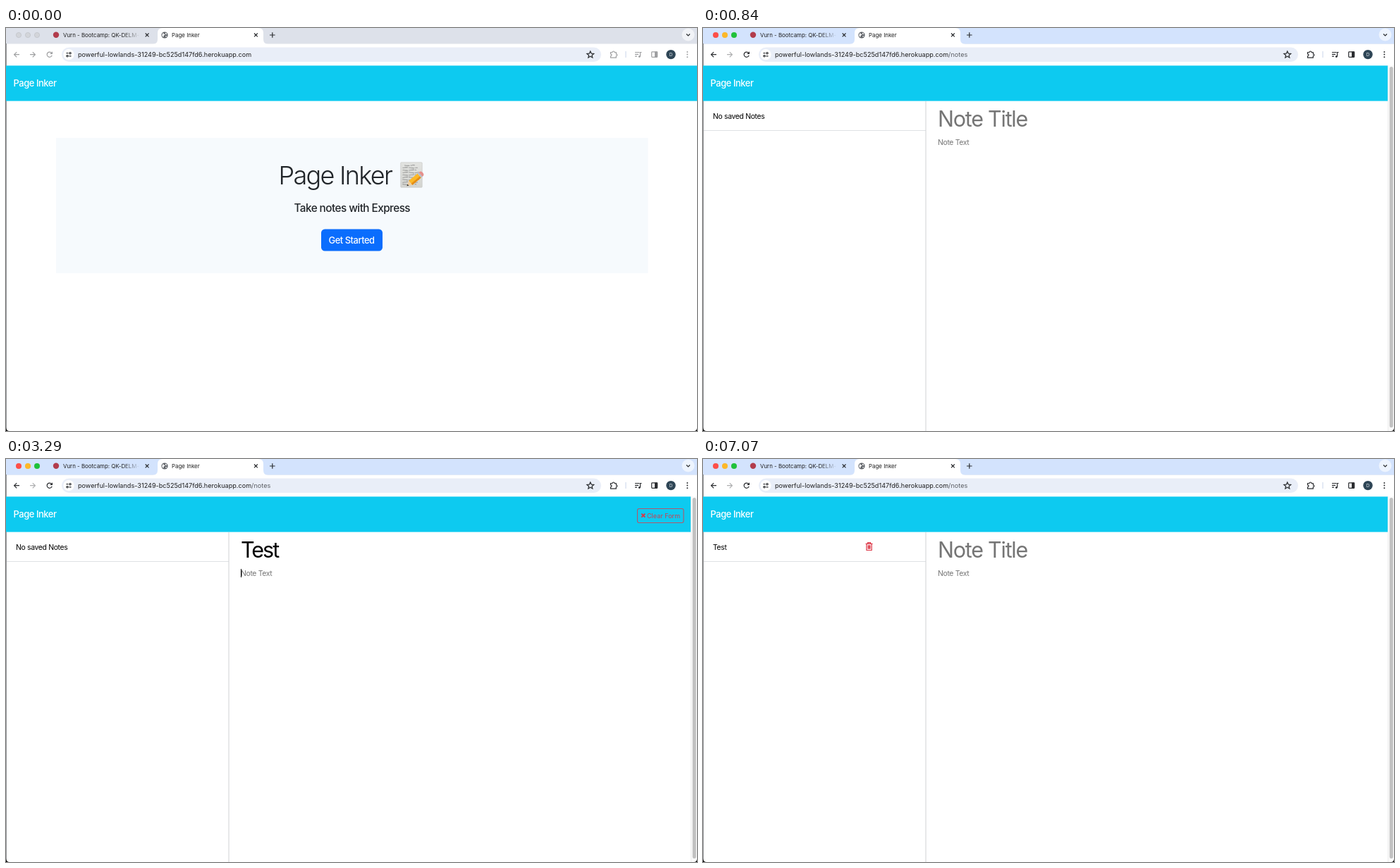
An HTML page that plays this animation: 980x572 px, repeating every 8 s.

```html
<!DOCTYPE html>
<html lang="en">
<head>
<meta charset="utf-8">
<title>Page Inker</title>
<style>
html, body { margin: 0; width: 980px; height: 572px; overflow: hidden; background: #fff; }
svg { display: block; }
text { font-family: Inter, Roboto, sans-serif; font-optical-sizing: none; white-space: pre; fill: #1f1f1f; }
.tab { font-size: 7.9px; }
.url { font-size: 9.05px; letter-spacing: .03px; }
.brand { font-size: 12.9px; font-weight: 450; letter-spacing: -.42px; fill: #fff; }
.hero { font-size: 36px; font-weight: 350; letter-spacing: -1.7px; fill: #212529; }
.lead { font-size: 15.3px; font-weight: 500; letter-spacing: -.54px; fill: #212529; }
.start { font-size: 12.9px; font-weight: 450; letter-spacing: -.46px; fill: #fff; }
.title { font-size: 30.5px; letter-spacing: -1.25px; fill: #000; }
.body { font-size: 10.4px; letter-spacing: -.33px; fill: #000; }
.small { font-size: 9.05px; }
.line { fill: none; stroke: #2b2d30; stroke-width: 1.2; }
</style>
</head>
<body>
<svg width="980" height="572" viewBox="0 0 980 572">
  <defs>
    <linearGradient id="fade" gradientUnits="userSpaceOnUse" x1="166" x2="190">
      <stop stop-color="#1f1f1f"/><stop offset="1" stop-color="#1f1f1f" stop-opacity="0"/>
    </linearGradient>
    <linearGradient id="paper" x2="0" y2="1">
      <stop stop-color="#e2e3e0"/><stop offset="1" stop-color="#d3d4d0"/>
    </linearGradient>
  </defs>
  <rect width="980" height="572" fill="#fff"/>

  <!-- tab strip -->
  <rect width="980" height="22.500" fill="#dde1ea"/>
  <rect id="strip" width="980" height="22.500" fill="#d3e3fd"/>
  <g fill="#d3d5da" stroke="#bfc2c8" stroke-width=".7">
    <circle cx="18" cy="10" r="3.6"/><circle cx="31" cy="10" r="3.6"/><circle cx="44" cy="10" r="3.6"/>
  </g>
  <g id="lights">
    <circle cx="18" cy="10" r="4" fill="#fe4f48"/><circle cx="31" cy="10" r="4" fill="#fdb827"/><circle cx="44" cy="10" r="4" fill="#1fc23a"/>
  </g>
  <path d="M208 23Q215 23 215 16V7Q215 0 222 0H358Q365 0 365 7V16Q365 23 372 23Z" fill="#fff"/>
  <circle cx="71" cy="9.8" r="4.2" fill="#b23c4c"/>
  <text class="tab" x="81" y="12.600" style="fill:url(#fade)">Vurn - Bootcamp: QK-DELM-</text>
  <path class="line" d="M197.700 7.500l4.800 4.800m0-4.800l-4.800 4.800M352 7.500l4.800 4.800m0-4.800l-4.800 4.800"/>
  <circle cx="225" cy="10" r="4.6" fill="#5f6368"/>
  <path d="M222 7.500l2 .2 1.500 1.800-1.800 1.300-.4 2.500-2-2.300zM226 6.600l2 1.200-.4 1.800-1.600-.8zM226 11.200l2.200-.3-1.200 2.400z" fill="#fff"/>
  <text class="tab" x="235" y="12.600">Page Inker</text>
  <path class="line" d="M374 10h7.600m-3.800-3.800v7.600"/>
  <circle cx="967.500" cy="9.500" r="9" fill="#fff" fill-opacity=".6"/>
  <path class="line" d="M965 8.500l2.500 2.500 2.500-2.500"/>

  <!-- toolbar -->
  <rect x="79" y="27.500" width="765" height="20.500" rx="10.250" fill="#e9eef8"/>
  <g id="tools">
    <path class="line" d="M19 37.700h-7.300m3.500-3.600l-3.600 3.600 3.600 3.600"/>
    <path id="forward" class="line" d="M34 37.700h7.300m-3.500-3.600l3.600 3.600-3.600 3.600"/>
    <path class="line" d="M64.700 35.600a3.600 3.600 0 1 0 .5 3.200M65.400 33.700v2.700h-2.700"/>
    <path class="line" d="M857.500 34.500h2.500a1.500 1.500 0 0 1 3 0h2.300v2.300a1.500 1.500 0 0 1 0 3v2.400h-7.800v-2.400a1.500 1.500 0 0 0 0-3z"/>
    <path class="line" d="M892 34.500h6.500M892 37.300h5M892 40.100h3M899.500 40.500v-6h2"/>
    <circle cx="898.300" cy="40.600" r="1.400" fill="#2b2d30"/>
    <rect class="line" x="915.700" y="33.800" width="8" height="7.600" rx=".8"/>
    <path d="M920 33.500h4v8h-4z" fill="#2b2d30"/>
    <g fill="#2b2d30"><circle cx="966.300" cy="34" r="1"/><circle cx="966.300" cy="37.600" r="1"/><circle cx="966.300" cy="41.200" r="1"/></g>
  </g>
  <circle cx="89" cy="37.700" r="7.600" fill="#fff"/>
  <path class="line" d="M85.500 35.700h2.800M89.500 39.800h3"/>
  <circle class="line" cx="91" cy="35.700" r="1.200"/><circle class="line" cx="87" cy="39.800" r="1.200"/>
  <text class="url" x="102" y="40.900">powerful-lowlands-31249-bc525d147fd6.herokuapp.com<tspan id="path" fill="#5b5e63">/notes</tspan></text>
  <path class="line" d="M828.800 32.900l1.400 3.200 3.500.3-2.700 2.300.8 3.400-3-1.800-3 1.800.8-3.400-2.700-2.300 3.500-.3z"/>
  <path d="M879 33v9" stroke="#c9d4ea"/>
  <circle cx="943" cy="37.600" r="6.700" fill="#2f4656"/>
  <text x="943" y="39.900" font-size="6.300" text-anchor="middle" style="fill:#e4eaf0">D</text>

  <!-- window edge and page header -->
  <path d="M.4 22V572" stroke="#66696d" stroke-width=".8"/>
  <rect y="53.400" width="980" height="50.200" fill="#0dcaf0"/>
  <text class="brand" x="10.500" y="83">Page Inker</text>

  <!-- landing page -->
  <g id="home">
    <rect x="71" y="156" width="839.500" height="192" fill="#f6fafd"/>
    <text class="hero" x="386.500" y="222">Page Inker</text>
    <rect x="559.700" y="190.800" width="30.500" height="35.500" rx="1" fill="url(#paper)" stroke="#c6c7c3" stroke-width=".6"/>
    <g id="scribble" fill="none" stroke="#777" stroke-width=".7"></g>
    <g transform="translate(568.500 224.300) rotate(-40)">
      <path d="M0 0L7-4V4z" fill="#f0cfa0"/>
      <path d="M0 0L2.500-1.400V1.400z" fill="#333"/>
      <path d="M7-4H23V4H7z" fill="#fcb827"/>
      <path d="M7 1.300H23V4H7z" fill="#e58d16"/>
      <path d="M23-4h2.500v8H23z" fill="#b9bfc4"/>
      <path d="M25.500-4h1q3 0 3 4t-3 4h-1z" fill="#e58f8c"/>
    </g>
    <text class="lead" x="408.500" y="261">Take notes with Express</text>
    <rect id="ring" x="445.700" y="284.100" width="89.600" height="33.700" rx="6.500" fill="none" stroke="#86b6fe" stroke-width="2.600"/>
    <rect x="447" y="285.400" width="87" height="31.100" rx="5.200" fill="#0a6dfd"/>
    <rect id="hover" x="447" y="285.400" width="87" height="31.100" rx="5.200" fill="#0b5ed7"/>
    <text class="start" x="457.500" y="305.500">Get Started</text>
  </g>

  <!-- notes page -->
  <g id="notes">
    <rect x="971" y="53" width="9" height="519" fill="#fafafa"/>
    <path d="M971.500 53v519" stroke="#e8e8e8" stroke-width=".7"/>
    <rect x="973.700" y="55" width="5" height="512" rx="2.500" fill="#c1c1c1"/>
    <path d="M1 145.500H316" stroke="#dfe1e4"/>
    <path d="M316 104V572" stroke="#cfd1d4"/>
    <text id="item" class="body" x="14" y="128.500"></text>
    <path id="trash" fill="none" stroke="#dc3545" stroke-width="1.200" d="M230.700 120.300h9.800M233.700 120v-1.300h3.800v1.300M232 121v8.500h7.200V121M234.200 122.300v5.500m1.400-5.500v5.500m1.400-5.500v5.500"/>
    <text id="title" class="title" x="333" y="140"></text>
    <text id="text" class="body" x="333" y="166"></text>
    <rect id="caret" width="1"/>
    <g id="clear">
      <rect x="895.500" y="70.500" width="65.500" height="20" rx="2.500" fill="none" stroke="#b4566a" stroke-width="1.100"/>
      <path d="M901.300 77.700l5 5m0-5l-5 5" stroke="#dc3545" stroke-width="1.900"/>
      <text class="small" x="909" y="83.800" style="fill:#cb4152">Clear Form</text>
    </g>
    <g id="save">
      <rect id="saveRing" x="825" y="69" width="67.500" height="23" rx="4" fill="none" stroke="#fff" stroke-opacity=".5" stroke-width="2.600"/>
      <rect id="saveBox" x="826.500" y="70.500" width="64.500" height="20" rx="2.500" stroke="#f8f9fa" stroke-width="1.100"/>
      <path id="disk" fill="none" stroke-width="1.200" d="M833 76.600h5.600l1.800 1.800v5.600H833zM834.800 76.600v2.600h3.400v-2.600M834.800 84v-2.600h3.800V84"/>
      <text id="saveText" class="small" x="843" y="83.800" letter-spacing="-.12">Save Note</text>
    </g>
  </g>

  <path d="M0 567Q.5 572 5 572H0zM980 568Q979.500 572 976 572H980z" fill="#000"/>
</svg>
<script>
const LOOP = 8000;
const $ = id => document.getElementById(id);
const show = (id, on) => $(id).style.display = on ? '' : 'none';
const clamp = v => Math.max(0, Math.min(1, v));
const at = (table, t) => table.filter(row => row[0] <= t).pop();

// time, typed text, caret x
const titleKeys = [[0, '', 333], [2450, 'T', 348.5], [2590, 'Te', 363.5], [2660, 'Tes', 378], [2800, 'Test', 387], [7000, '', 333]];
const textKeys = [[0, '', 333], [3780, 'A', 339.5], [4060, 'Ad', 346], [4130, 'Add', 352], [4620, 'Add ', 354],
  [4760, 'Add t', 357.5], [4830, 'Add to', 363], [5040, 'Add to ', 366], [5320, 'Add to L', 372],
  [5530, 'Add to Le', 378], [5670, 'Add to Lef', 381], [5880, 'Add to Left', 385], [7000, '', 333]];
// time, field with a visible caret
const focus = [[0, ''], [1680, 'title'], [2240, ''], [2450, 'title'], [3290, 'text'], [6440, '']];

// handwriting on the sheet
let ink = '';
for (let row = 0; row < 9; row++) {
  let d = `M${row ? 562.5 : 565} ${195 + row * 3.4}`;
  const count = row ? 11 - row % 3 : 7;
  for (let i = 0; i < count; i++) d += `q.6 ${Math.sin(i * 7 + row * 3) * 2.2} 1.3 0` + (i % 4 == 3 ? 'm1.4 0' : 'h.7');
  ink += `<path d="${d}"/>`;
}
$('scribble').innerHTML = ink;

function field(id, value, hint, spacing) {
  const el = $(id);
  el.textContent = value || hint;
  el.style.fill = value ? '#000' : '#757575';
  el.style.letterSpacing = value ? spacing : '';
}

function draw(t) {
  const active = clamp((Math.floor(t / 70) - 1) / 3);
  const onNotes = t >= 840;
  $('strip').style.opacity = $('lights').style.opacity = active;
  $('tools').style.opacity = .45 + .55 * active;
  $('forward').style.opacity = onNotes ? .38 : 1;
  show('path', onNotes);
  show('home', !onNotes);
  show('notes', onNotes);
  $('hover').style.opacity = clamp((t - 460) / 150);
  show('ring', t >= 770);

  const title = at(titleKeys, t), text = at(textKeys, t), where = at(focus, t)[1];
  field('title', title[1], 'Note Title', '-2px');
  field('text', text[1], 'Note Text', '-.24px');

  show('caret', where);
  const big = where == 'title', caret = $('caret');
  caret.setAttribute('x', (big ? title : text)[2]);
  caret.setAttribute('y', big ? 112 : 156);
  caret.setAttribute('height', big ? 33 : 12);

  show('clear', title[1]);
  show('save', text[1]);
  const lit = clamp((t - 6600) / 150);
  const shade = Math.round(255 * (1 - lit));
  $('saveBox').style.fill = `rgba(248,249,250,${lit})`;
  $('saveText').style.fill = $('disk').style.stroke = `rgb(${shade},${shade},${shade})`;
  show('saveRing', t >= 6720);

  const saved = t >= 7070;
  $('item').textContent = saved ? 'Test' : 'No saved Notes';
  show('trash', saved);
}

const start = performance.now();
function tick() {
  draw((performance.now() - start) % LOOP);
  requestAnimationFrame(tick);
}
draw(0);
requestAnimationFrame(tick);
</script>
</body>
</html>
```
